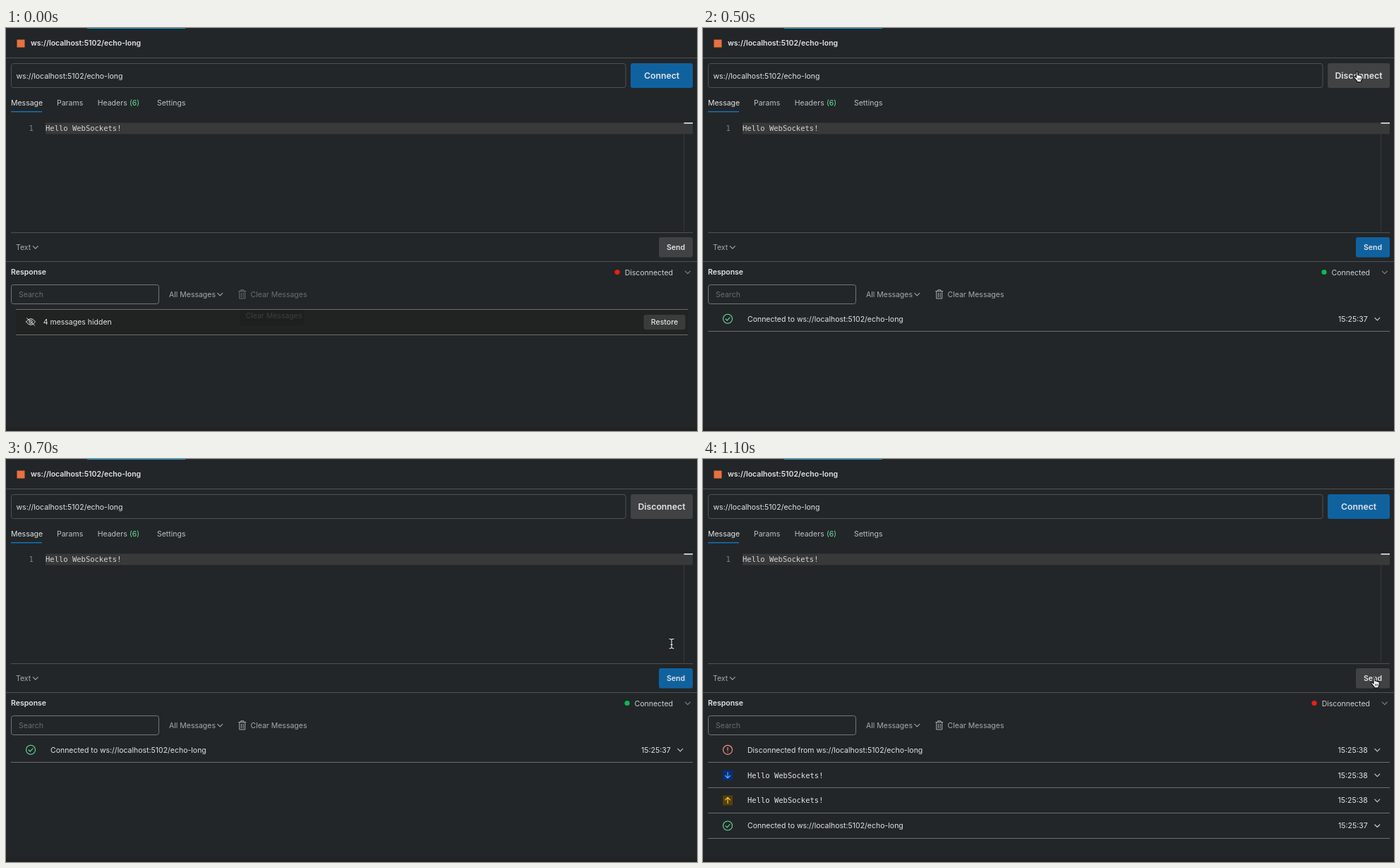
Recreate the animation shown at these times as an HTML page with a canvas. Size 979 by 572 pixels, loop 1.88 s.

```html
<!DOCTYPE html>
<html lang="en">
<head>
<meta charset="utf-8">
<title>WebSocket client</title>
<style>
html, body { margin: 0; width: 100%; height: 100%; overflow: hidden; background: #222629; }
canvas { display: block; width: 979px; height: 572px; }
</style>
</head>
<body>
<canvas id="stage"></canvas>
<script>
const W = 979, H = 572, LOOP = 1880;
const canvas = document.getElementById('stage');
const ctx = canvas.getContext('2d');
const dpr = window.devicePixelRatio || 1;
canvas.width = W * dpr;
canvas.height = H * dpr;

const URL_TEXT = 'ws://localhost:5102/echo-long';
const HELLO = 'Hello WebSockets!';
const SANS = 'Inter, sans-serif';
const MONO = '"DejaVu Sans Mono", monospace';
const C = {
  bg: '#222629', dark: '#212222', line: '#505253', text: '#e3e3e3', soft: '#a9aaab',
  dim: '#6c6e70', blue: '#10629f', hover: '#0c74bd', gray: '#414243',
  green: '#6bdd9a', red: '#eb2013'
};

function text(s, x, y, { color = C.text, size = 10.5, weight = 400, align = 'left', font = SANS } = {}) {
  ctx.font = `${weight} ${size}px ${font}`;
  ctx.fillStyle = color;
  ctx.textAlign = align;
  ctx.fillText(s, x, y);
}

function rect(x, y, w, h, color) {
  ctx.fillStyle = color;
  ctx.fillRect(x, y, w, h);
}

function box(x, y, w, h, fill, border, r = 3) {
  ctx.beginPath();
  ctx.roundRect(x, y, w, h, r);
  if (fill) { ctx.fillStyle = fill; ctx.fill(); }
  if (border) { ctx.strokeStyle = border; ctx.lineWidth = 1; ctx.stroke(); }
}

function dot(x, y, r, color) {
  ctx.beginPath();
  ctx.arc(x, y, r, 0, 7);
  ctx.fillStyle = color;
  ctx.fill();
}

function stroke(path, x, y, color, width = 1.1) {
  ctx.save();
  ctx.translate(x, y);
  ctx.strokeStyle = color;
  ctx.lineWidth = width;
  ctx.lineCap = ctx.lineJoin = 'round';
  ctx.stroke(new Path2D(path));
  ctx.restore();
}

const chevron = (x, y, color = C.soft) => stroke('M-3.5-1.7L0 1.8L3.5-1.7', x, y, color);

function trash(x, y, color) {
  stroke('M-5-4.5H5M-2-4.5V-6.3H2V-4.5M-4-4.5V6H4V-4.5M-1.4-2V4M1.4-2V4', x, y, color, 1);
}

function hiddenEye(x, y) {
  stroke('M-6.5 0Q0-9 6.5 0Q0 9-6.5 0M-5.5-5.2L5.5 5.2M2.3 0A2.3 2.3 0 1 1-2.3 0A2.3 2.3 0 1 1 2.3 0', x, y, C.text, 1);
}

function button(label, x, y, w, h, fill, size = 10.5, weight = 600) {
  box(x, y, w, h, fill);
  text(label, x + w / 2, y + h / 2 + size * 0.36, { size, weight, align: 'center' });
}

// Static parts of the window
function drawFrame() {
  rect(0, 0, W, H, C.bg);
  rect(0, 567, W, 5, C.dark);
  rect(0, 0, W, 0.5, '#303436');
  rect(115, 0, 139, 1, '#0e9bd2');
  rect(15.5, 16.5, 11, 11, '#e8713f');
  text(URL_TEXT, 35, 25.4, { weight: 600 });
  rect(0, 42, W, 1, C.line);
  box(7.5, 50.5, 870.5, 34, null, C.line);
  text(URL_TEXT, 14.5, 71.5);

  text('Message', 7, 110);
  text('Params', 72, 110, { color: '#bfc0c1' });
  text('Headers', 129.7, 110, { color: '#bfc0c1' });
  text('(6)', 175, 110, { color: C.green });
  text('Settings', 214, 110, { color: '#bfc0c1' });
  rect(7, 118, 44, 1.5, '#1273b6');

  rect(56, 134.5, 917, 16, '#383939');
  text('1', 32.5, 145.7, { font: MONO, color: '#858585' });
  text(HELLO, 56, 145.7, { font: MONO, color: '#d4d4d4' });
  rect(960, 134, 1, 155, '#35393b');
  rect(960.5, 134, 12.5, 2, '#c4c5c5');

  rect(7, 290, 966, 1, C.line);
  text('Text', 14, 315.3, { color: C.soft });
  chevron(41.8, 311.3);
  rect(0, 331, W, 1, C.line);
  text('Response', 7, 350, { weight: 600 });
  box(7.5, 364.5, 209, 27, null, '#747677');
  text('Search', 18, 382, { color: C.dim });
  text('All Messages', 231, 382, { color: C.soft });
  chevron(303.3, 378);
  chevron(965.8, 346.8, '#858789');
}

function drawStatus(connected) {
  const label = connected ? 'Connected' : 'Disconnected';
  text(label, 945, 350.5, { align: 'right', color: '#d0d1d1' });
  dot(connected ? 880 : 866, 346.5, 3.6, connected ? '#0cbb52' : C.red);
}

function drawHidden(t) {
  rect(14, 399, 952, 37, C.dark);
  rect(14, 399, 952, 1, '#6b6c6d');
  rect(14, 435, 952, 1, '#6b6c6d');
  hiddenEye(35, 417);
  text('4 messages hidden', 52.7, 421.3);
  button('Restore', 903.5, 407, 59, 21, '#3a3b3b', 10.5, 500);
  if (t < 300) box(331, 400, 91, 23, 'rgba(30,31,32,.65)');
  if (t < 100) text('Clear Messages', 339.5, 412, { color: '#3c3e3f' });
}

const rowIcons = {
  ok(y) {
    stroke('M6.5 0A6.5 6.5 0 1 1-6.5 0A6.5 6.5 0 1 1 6.5 0M-3 .2L-.8 2.3L3-2', 35, y, C.green);
  },
  error(y) {
    stroke('M6.5 0A6.5 6.5 0 1 1-6.5 0A6.5 6.5 0 1 1 6.5 0M0-3.3V.6M0 3V3.1', 35, y, '#f48f7d', 1.2);
  },
  down(y) {
    rect(28, y - 7, 14, 14, '#05307c');
    stroke('M0-4V4M-3.4 .8L0 4.2L3.4 .8', 35, y, '#77aef5');
  },
  up(y) {
    rect(28, y - 7, 14, 14, '#564006');
    stroke('M0 4V-4M-3.4-.8L0-4.2L3.4-.8', 35, y, '#ffd45f');
  }
};

function row(i, icon, label, time, font = SANS) {
  const y = 412.8 + i * 35.9;
  rowIcons[icon](y);
  text(label, 63, y + 3.8, { font });
  text(time, 941.7, y + 3.8, { align: 'right' });
  chevron(955.3, y + 0.2, '#d0d1d1');
  rect(7, 430 + i * 36, 966, 1, '#6b6c6d');
}

function drawLog(done) {
  const opened = ['ok', 'Connected to ' + URL_TEXT, '15:25:37'];
  if (!done) return row(0, ...opened);
  row(0, 'error', 'Disconnected from ' + URL_TEXT, '15:25:38');
  row(1, 'down', HELLO, '15:25:38', MONO);
  row(2, 'up', HELLO, '15:25:38', MONO);
  row(3, ...opened);
}

function shape(path, x, y, fill, edge) {
  ctx.save();
  ctx.translate(x, y);
  const p = new Path2D(path);
  ctx.lineJoin = 'round';
  ctx.lineWidth = 1.2;
  ctx.strokeStyle = edge;
  ctx.fillStyle = fill;
  ctx.fill(p);
  ctx.stroke(p);
  ctx.restore();
}

const cursors = {
  hand(x, y) {
    shape('M-2.5 1V-5.3Q-2.5-6.6-1.4-6.6T-.3-5.3V-1.7Q.7-2.6 1.7-1.3Q2.8-2 3.6-.7Q5.8-1.1 5.8 1V3.2Q5.8 5 4.6 6.4V8H-1.5V6.6Q-3.3 5.2-5.6 1.8Q-6.2.4-5.1 0Q-4 0-2.5 2Z', x, y, '#fff', '#111');
    stroke('M0 2.5V5.3M1.8 2.5V5.3M3.6 2.5V5.3', x, y, '#111', 0.7);
  },
  beam(x, y) {
    const p = 'M-3-6.5Q0-6.5 0-5Q0-6.5 3-6.5M0-5V5.5M-3 7Q0 7 0 5.5Q0 7 3 7M-1.3 1.7H1.3';
    stroke(p, x, y, '#111', 2.4);
    stroke(p, x, y, '#eee', 1.2);
  },
  arrow(x, y) {
    shape('M0 0V12L2.7 9.5L4.5 13.7L6.6 12.8L4.8 8.7H8.5Z', x, y, '#000', '#fff');
  }
};

// Pointer poses: start time, kind, position
const poses = [
  [300, 'hand', 928, 68.5],
  [600, 'arrow', 934, 27],
  [700, 'beam', 943, 261.8],
  [800, 'beam', 947, 282],
  [900, 'hand', 952, 314],
  [1000, 'hand', 952.5, 316.8]
];

function drawPointer(t) {
  const pose = poses.filter(p => p[0] <= t).pop();
  if (pose) cursors[pose[1]](pose[2], pose[3]);
}

function draw(t) {
  const connected = t >= 500 && t < 1100;
  const done = t >= 1100;
  ctx.setTransform(dpr, 0, 0, dpr, 0, 0);
  drawFrame();

  const main = connected ? C.gray : t >= 300 && t < 500 ? C.hover : C.blue;
  button(connected ? 'Disconnect' : 'Connect', 885, 50, 88, 35, main, 12.25);
  const send = !connected ? C.gray : t >= 900 ? C.hover : C.blue;
  button('Send', 925, 297, 48, 28.5, send);

  drawStatus(connected);
  const clearColor = t < 500 ? C.dim : C.soft;
  trash(334.7, 378, clearColor);
  text('Clear Messages', 346.5, 382, { color: clearColor });
  if (t < 500) drawHidden(t);
  else drawLog(done);
  drawPointer(t);
}

function tick(now) {
  draw(now % LOOP);
  requestAnimationFrame(tick);
}
requestAnimationFrame(tick);
</script>
</body>
</html>
```
